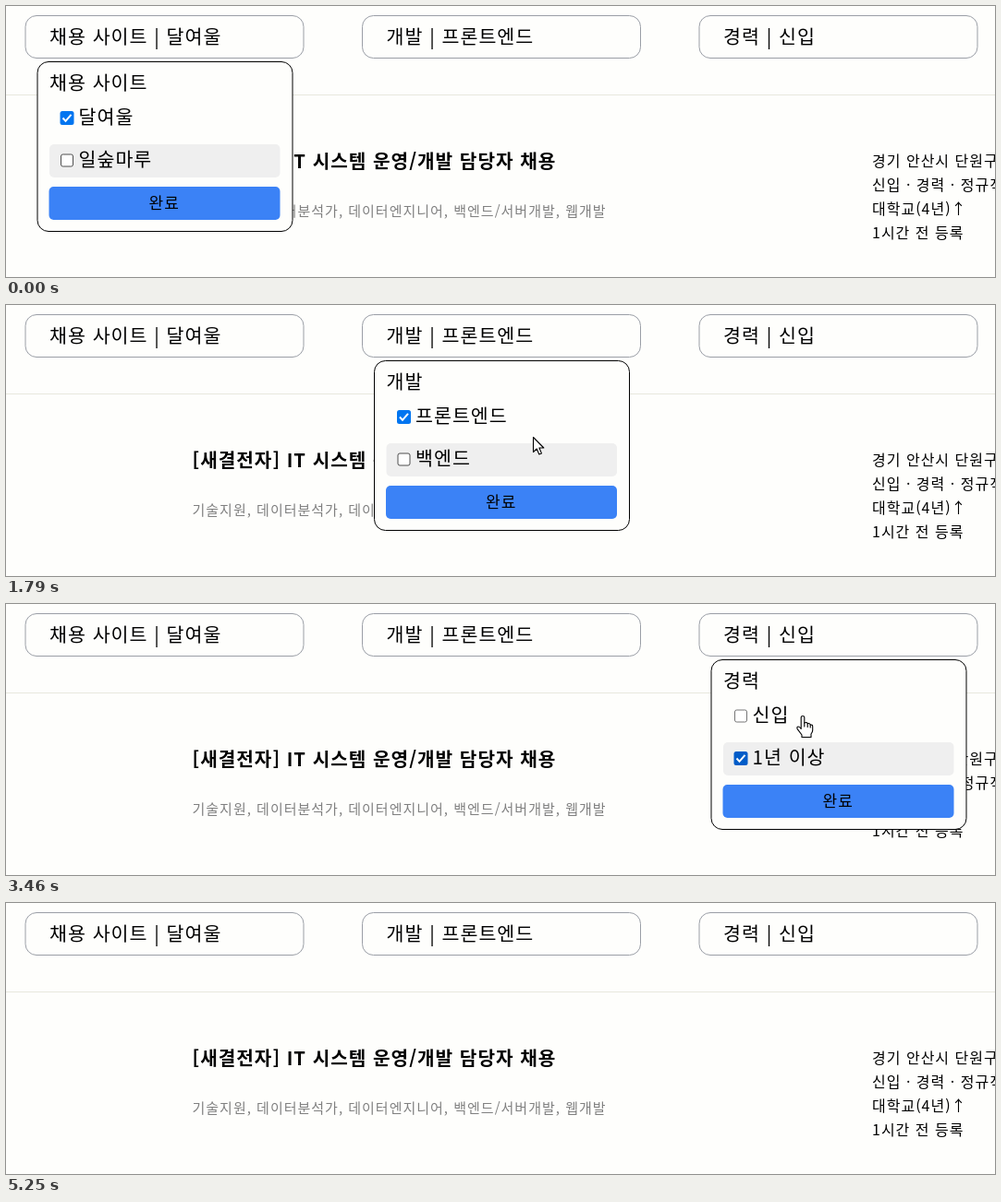
An HTML page that plays this animation: 1070 by 294 pixels, repeating every 5290 ms.

```html
<!DOCTYPE html>
<html lang="ko">
<head>
<meta charset="utf-8">
<title>채용 필터</title>
<style>
  html, body { margin: 0; width: 100%; height: 100%; overflow: hidden; background: #fefefc; }
  svg { display: block; }
  text { font: 350 20.6px "Noto Sans CJK KR", "Noto Sans CJK", sans-serif; letter-spacing: 1px; white-space: pre; }
  .box { fill: none; stroke: #9a9ea6; }
  .panel { fill: #fefefc; stroke: #000; }
  .row { fill: #efefef; }
  .done { fill: #3b82f6; }
  .title { font-size: 20.2px; font-weight: 700; }
  .tags { font-size: 15px; font-weight: 400; fill: #808080; }
  .info { font-size: 16px; }
  .small { font-size: 17px; }
  .off { fill: #fff; stroke: #767676; }
  .on rect { fill: #0075f0; }
  .on path { fill: none; stroke: #fff; stroke-width: 2; }
  .hover .on rect { fill: #005cc8; }
  .hover .off { stroke: #4f4f4f; }
  .cursor { fill: #fff; stroke: #000; stroke-width: 1.1; stroke-linejoin: round; stroke-linecap: round; }
</style>
</head>
<body>
<svg width="1070" height="294" viewBox="0 0 1070 294"></svg>
<script>
const LOOP = 5290;
const STEP = 364.5;

// Times at which each panel opens and closes, its choice flips and its second row is hovered
const filters = [
  { name: '채용 사이트', options: ['달여울', '일숲마루'], open: 0, close: 1300, flip: 270, hover: [0, 480] },
  { name: '개발', options: ['프론트엔드', '백엔드'], open: 1340, close: 2710, flip: 1920, hover: [1620, 2040] },
  { name: '경력', options: ['신입', '1년 이상'], open: 2710, close: 4210, flip: 3050, hover: [2900, 3560] },
];

// Pointer stops: time, x, y of the tip, shape until the next stop
const stops = [
  [90, 112, 164, 'hand'], [330, 112, 164, 'hand'], [450, 230, 140, 'arrow'],
  [680, 500, 62, 'arrow'], [750, 546, 45, 'hand'], [790, 546, 45, 'hand'],
  [930, 552, 2, 'arrow'], [1040, 550, 20, 'hand'], [1130, 548, 36, 'hand'],
  [1340, 548, 38, 'hand'], [1580, 556, 168, 'hand'], [1710, 558, 166, 'hand'],
  [1790, 570, 143, 'arrow'], [1880, 570, 143, 'arrow'], [2280, 850, 42, 'hand'],
  [2450, 868, 34, 'hand'], [2590, 873, 121, 'hand'], [2670, 873, 121, 'hand'],
  [2900, 870, 164, 'hand'], [3250, 870, 164, 'hand'], [3460, 862, 121, 'hand'],
  [3500, 862, 121, 'hand'], [3700, 800, 98, 'arrow'], [4090, 738, 78, 'arrow'],
  [4250, 736, 78, 'arrow'], [4540, 712, 104, 'arrow'], [5000, 712, 104, 'arrow'],
];

const text = (x, y, content, type = '') => `<text x="${x}" y="${y}" class="${type}">${content}</text>`;
const rect = (x, y, w, h, r, type) =>
  `<rect x="${x}" y="${y}" width="${w}" height="${h}" rx="${r}" class="${type}"/>`;

const checkbox = y => rect(59.5, y - 6.5, 13, 13, 2, 'off') +
  `<g class="on">${rect(58.5, y - 7.5, 15, 15, 2.5, '')}<path d="M61.5 ${y}l3 3.3 6-7"/></g>`;

const option = (label, y) => `<g class="option">${rect(47, y - 18, 249.5, 36, 5, 'row')}
  ${checkbox(y - .5)}${text(78.5, y + 5.5, label)}</g>`;

const button = (f, i) => `<g transform="translate(${i * STEP})">
  ${rect(21, 10.5, 301, 46, 12, 'box')}${text(47, 41.3, `${f.name} | ${f.options[0]}`)}</g>`;

const panel = (f, i) => `<g class="menu" transform="translate(${i * STEP})">
  ${rect(34, 60.5, 276, 184, 12, 'panel')}${text(47, 91, f.name)}
  ${option(f.options[0], 122)}${option(f.options[1], 168)}
  ${rect(46.5, 196, 250, 36, 5, 'done')}${text(154.5, 220, '완료', 'small')}</g>`;

const info = ['경기 안산시 단원구', '신입 · 경력 · 정규직', '대학교(4년)↑', '1시간 전 등록'];

document.querySelector('svg').innerHTML = `
  <path d="M0 96.5H1070" stroke="#e7e7de"/>
  ${filters.map(button).join('')}
  ${text(201.5, 176.3, '[새결전자] IT 시스템 운영/개발 담당자 채용', 'title')}
  ${text(201.5, 228.3, '기술지원, 데이터분석가, 데이터엔지니어, 백엔드/서버개발, 웹개발', 'tags')}
  ${info.map((line, i) => text(937, 174 + 26 * i, line, 'info')).join('')}
  ${filters.map(panel).join('')}
  <g class="cursor">
    <path id="arrow" d="M.5 .5V16.5L4.2 13 6.8 19 9.4 17.9 6.9 12H11.8Z"/>
    <g id="hand">
      <path d="M-1.8 13V2Q-1.8 .5 0 .5T1.8 2V8Q4.6 6.6 5.2 8.8 7.6 7.9 8.2 10 10.7 9.6 10.7 12V16Q10.7 18 9 20V23.5H-1V21L-5.8 14.6Q-6.8 12.5-5 12-3.5 11.8-1.8 14.5Z"/>
      <path d="M1.8 8V12M5.2 8.8V12.5M8.2 10V13" fill="none"/>
    </g>
  </g>`;

const menus = [...document.querySelectorAll('.menu')];
const cursor = document.querySelector('.cursor');
const show = (element, visible) => element.style.display = visible ? '' : 'none';
const within = (t, from, to) => t >= from && t < to;

function drawMenu(menu, f, t) {
  show(menu, within(t, f.open, f.close));
  const chosen = t < f.flip ? 0 : 1;
  menu.querySelectorAll('.option').forEach((row, i) => {
    const hovered = i === 1 && within(t, ...f.hover);
    row.classList.toggle('hover', hovered);
    show(row.querySelector('.row'), hovered);
    show(row.querySelector('.on'), i === chosen);
  });
}

function drawCursor(t) {
  const next = stops.findIndex(stop => stop[0] > t);
  show(cursor, next > 0);
  if (next < 1) return;
  const [t0, x0, y0, shape] = stops[next - 1];
  const [t1, x1, y1] = stops[next];
  const k = (t - t0) / (t1 - t0);
  cursor.setAttribute('transform', `translate(${x0 + (x1 - x0) * k} ${y0 + (y1 - y0) * k})`);
  for (const id of ['arrow', 'hand']) show(document.getElementById(id), id === shape);
}

function frame() {
  const t = performance.now() % LOOP;
  filters.forEach((f, i) => drawMenu(menus[i], f, t));
  drawCursor(t);
  requestAnimationFrame(frame);
}
frame();
</script>
</body>
</html>
```
